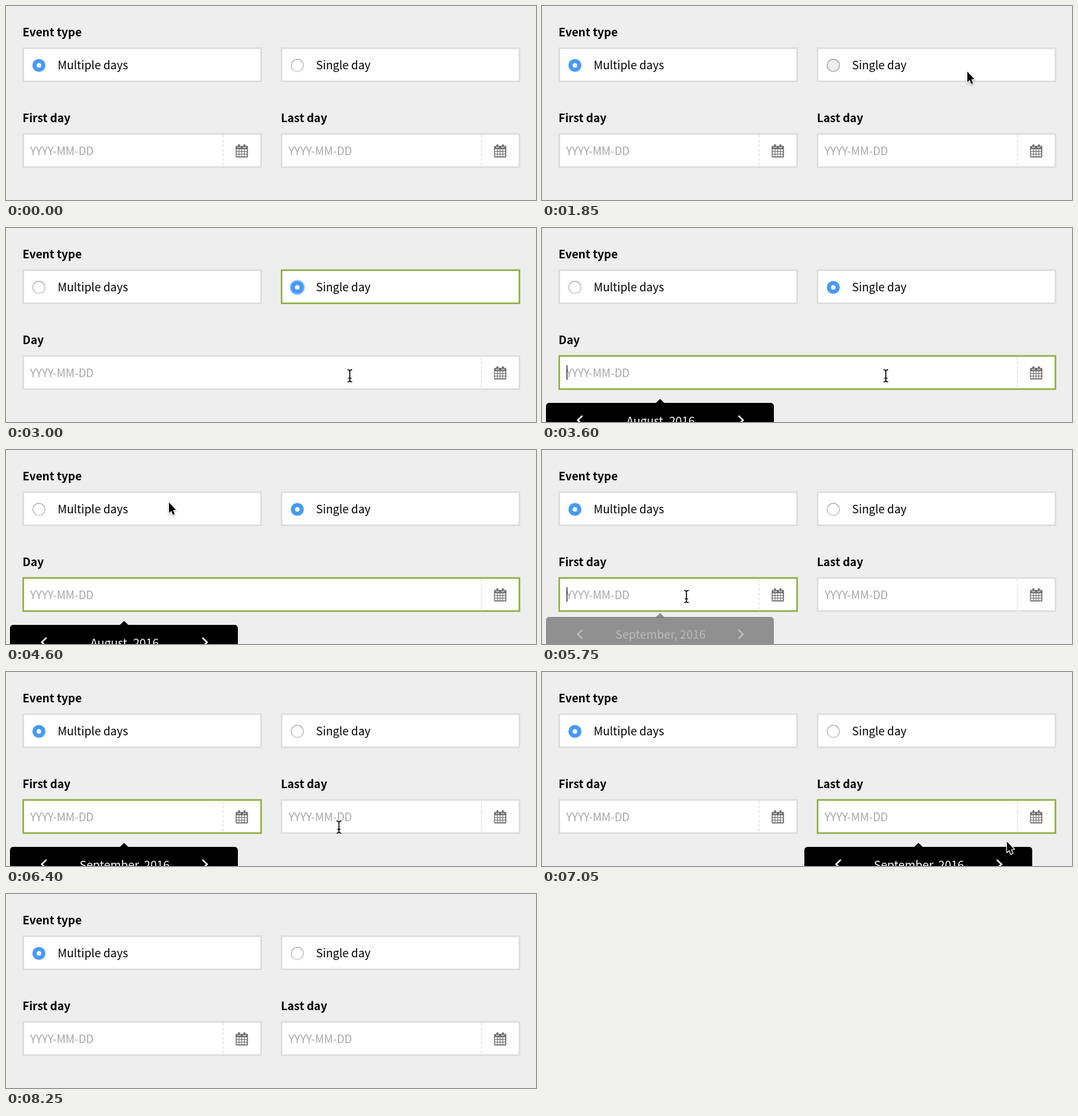
An HTML page with a canvas that plays this animation: 800x294 px, repeating every 8300 ms.

```html
<!DOCTYPE html>
<html lang="en">
<head>
<meta charset="utf-8">
<title>Event form</title>
<style>
  html, body { margin: 0; width: 100%; height: 100%; overflow: hidden; background: #eee; }
  canvas { display: block; width: 800px; height: 294px; }
</style>
</head>
<body>
<canvas id="stage" width="800" height="294"></canvas>
<script>
const ctx = document.getElementById('stage').getContext('2d');
const LOOP = 8300;
const FAMILY = '"Noto Sans CJK SC", "Noto Sans CJK JP", "Noto Sans CJK", "Noto Sans", sans-serif';
const GREY = '#dcdcdc', GREEN = '#8fad41', BLUE = '#459af7';
const LEFT = 25, RIGHT = 415, HALF = 361, FULL = 751;
const FIELD_TOP = 193, BOX_HEIGHT = 52, ICON_WIDTH = 59;

// Which control has the focus from each time on
const focusSteps = [
  [0, ''], [1900, 'single'], [3150, 'first'], [4700, 'multiple'],
  [5750, 'first'], [6430, 'last'], [7250, '']
];

// Pointer path: time, x, y, easing towards this point
const path = [
  [1000, 748, 296, 'both'], [1450, 642, 99, 'both'],
  [2150, 642, 99, 'both'], [2650, 606, 142, 'in'], [3000, 519, 224, 'out'],
  [4100, 519, 224, 'both'], [4600, 246, 79, 'both'],
  [5250, 246, 79, 'both'], [5550, 218, 222, 'both'],
  [5900, 218, 222, 'both'], [6400, 502.5, 235, 'both'],
  [6850, 502.5, 235, 'both'], [7150, 770, 264, 'both'],
  [7280, 770, 264, 'both'], [7450, 758, 298, 'in']
];

const ease = {
  in: p => p * p,
  out: p => p * (2 - p),
  both: p => p * p * (3 - 2 * p)
};
const clamp = v => Math.max(0, Math.min(1, v));
const between = (t, a, b) => t >= a && t < b;

function text(str, x, y, size, color, weight = 400, align = 'left') {
  ctx.font = `${weight} ${size}px ${FAMILY}`;
  ctx.textAlign = align;
  ctx.fillStyle = color;
  ctx.fillText(str, x, y);
}

function disc(x, y, r, color) {
  ctx.fillStyle = color;
  ctx.beginPath();
  ctx.arc(x, y, r, 0, Math.PI * 2);
  ctx.fill();
}

function polyline(points, close) {
  ctx.beginPath();
  points.forEach(([x, y]) => ctx.lineTo(x, y));
  if (close) ctx.closePath();
}

function box(x, y, w, focused) {
  ctx.fillStyle = '#fff';
  ctx.fillRect(x, y, w, BOX_HEIGHT);
  ctx.strokeStyle = focused ? GREEN : GREY;
  ctx.lineWidth = 2.4;
  ctx.strokeRect(x + 1, y + 0.9, w - 2, BOX_HEIGHT - 1.8);
}

function radio(x, y, checked, pressed, focusAge) {
  if (checked) {
    if (focusAge >= 0) {
      const p = clamp(focusAge / 150);
      ctx.globalAlpha = 0.3 + 0.7 * p;
      disc(x, y, 16 - 4.4 * p, '#a3cdf8');
      ctx.globalAlpha = 1;
    }
    disc(x, y, 9.8, BLUE);
    disc(x, y, 3.5, '#fff');
    return;
  }
  disc(x, y, 9.3, pressed ? '#eeeeee' : '#fff');
  const rim = ctx.createLinearGradient(0, y - 10, 0, y + 10);
  rim.addColorStop(0, pressed ? '#999' : '#a6a6a6');
  rim.addColorStop(1, pressed ? '#aaa' : '#c4c4c4');
  ctx.strokeStyle = rim;
  ctx.lineWidth = 1.3;
  ctx.beginPath();
  ctx.arc(x, y, 9.3, 0, Math.PI * 2);
  ctx.stroke();
}

function option(x, label, state) {
  box(x, 63, HALF, state.focusAge >= 0);
  radio(x + 24.7, 90, state.checked, state.pressed, state.focusAge);
  text(label, x + 53, 96, 17.1, '#000');
}

function calendarIcon(x, y) {
  ctx.fillStyle = '#6e6e6e';
  ctx.beginPath();
  ctx.roundRect(x, y + 2.5, 18.5, 17.5, 1.5);
  ctx.fill();
  ctx.fillStyle = '#fff';
  for (let row = 0; row < 3; row++)
    for (let col = 0; col < 4; col++)
      ctx.fillRect(x + 1.4 + col * 4.1, y + 7.6 + row * 3.9, 3.1, 2.9);
  for (const dx of [3.4, 11.6]) {
    ctx.fillStyle = '#fff';
    ctx.fillRect(x + dx - 0.4, y + 2, 4.2, 3.6);
    ctx.fillStyle = '#6e6e6e';
    ctx.beginPath();
    ctx.roundRect(x + dx, y, 3.4, 5, 1.5);
    ctx.fill();
  }
}

function field(x, w, label, focusAge) {
  text(label, x, 176, 17, '#000', 600);
  box(x, FIELD_TOP, w, focusAge >= 0);
  text('YYYY-MM-DD', x + 11.5, 226, 16.7, '#a6a6a6');

  const split = x + w - ICON_WIDTH;
  ctx.strokeStyle = '#d9d9d9';
  ctx.lineWidth = 1.2;
  ctx.setLineDash([4, 3]);
  polyline([[split + 0.5, 195.5], [split + 0.5, 243]]);
  ctx.stroke();
  ctx.setLineDash([]);
  calendarIcon(split + 19.7, 209.5);

  if (focusAge >= 0 && Math.floor(focusAge / 475) % 2 === 0) {
    ctx.fillStyle = '#222';
    ctx.fillRect(x + 12, 208, 1.3, 22);
  }
}

function chevron(x, dir) {
  polyline([[x + 7 * dir, 284.5], [x, 291.3], [x + 7 * dir, 298]]);
  ctx.strokeStyle = '#fff';
  ctx.lineWidth = 2.4;
  ctx.stroke();
}

function picker(x, month, age) {
  const p = 1 - Math.pow(1 - clamp((age + 30) / 200), 3);
  ctx.save();
  ctx.globalAlpha = p;
  ctx.translate(x, -20 * (1 - p));
  ctx.fillStyle = '#000';
  ctx.beginPath();
  ctx.roundRect(6, 265, 344, 80, 5);
  ctx.fill();
  polyline([[171.5, 265.5], [178.3, 259], [185, 265.5]], true);
  ctx.fill();
  chevron(54, 1);
  chevron(303.5, -1);
  text(`${month}, 2016`, 179, 298.5, 17.4, '#fff', 500, 'center');
  ctx.restore();
}

function arrow(x, y) {
  ctx.save();
  ctx.translate(x, y);
  polyline([[0, 0.5], [0, 16.5], [3.5, 13.2], [6, 19.2], [8.6, 18.1], [6.1, 12.2], [10.6, 11.8]], true);
  ctx.lineJoin = 'round';
  ctx.shadowColor = 'rgba(0,0,0,.35)';
  ctx.shadowBlur = 2;
  ctx.shadowOffsetY = 1;
  ctx.strokeStyle = '#fff';
  ctx.lineWidth = 2.4;
  ctx.stroke();
  ctx.shadowColor = 'transparent';
  ctx.fillStyle = '#000';
  ctx.fill();
  ctx.restore();
}

function beam(x, y) {
  ctx.save();
  ctx.translate(x, y);
  ctx.beginPath();
  for (const s of [-1, 1]) {
    ctx.moveTo(-3.5, 9.3 * s);
    ctx.quadraticCurveTo(0, 9.3 * s, 0, 6.5 * s);
    ctx.quadraticCurveTo(0, 9.3 * s, 3.5, 9.3 * s);
  }
  ctx.moveTo(0, -7);
  ctx.lineTo(0, 7);
  ctx.moveTo(-2.4, 3.4);
  ctx.lineTo(2.4, 3.4);
  for (const [color, width] of [['#fff', 3.4], ['#000', 1.5]]) {
    ctx.strokeStyle = color;
    ctx.lineWidth = width;
    ctx.stroke();
  }
  ctx.restore();
}

function pointerAt(t) {
  const i = path.findIndex(key => key[0] > t);
  if (i < 1) return null;
  const [t0, x0, y0] = path[i - 1];
  const [t1, x1, y1, kind] = path[i];
  const p = ease[kind]((t - t0) / (t1 - t0));
  return [x0 + (x1 - x0) * p, y0 + (y1 - y0) * p];
}

function drawPointer(t, fields) {
  const at = pointerAt(t);
  if (!at) return;
  const [x, y] = at;
  const typing = between(y, FIELD_TOP, FIELD_TOP + BOX_HEIGHT) &&
    fields.some(f => between(x, f.x, f.x + f.w - ICON_WIDTH));
  (typing ? beam : arrow)(x, y);
}

function draw(t) {
  const [since, focus] = focusSteps.filter(step => step[0] <= t).pop();
  const age = name => focus === name ? t - since : -1;
  const single = between(t, 1900, 4700);

  ctx.fillStyle = '#eee';
  ctx.fillRect(0, 0, 800, 294);
  text('Event type', LEFT, 46, 17, '#000', 600);
  option(LEFT, 'Multiple days', {
    checked: !single, pressed: between(t, 4650, 4700), focusAge: age('multiple')
  });
  option(RIGHT, 'Single day', {
    checked: single, pressed: between(t, 1850, 1900), focusAge: age('single')
  });

  const fields = single
    ? [{ x: LEFT, w: FULL, label: 'Day', id: 'first' }]
    : [{ x: LEFT, w: HALF, label: 'First day', id: 'first' },
       { x: RIGHT, w: HALF, label: 'Last day', id: 'last' }];
  for (const f of fields) field(f.x, f.w, f.label, age(f.id));
  for (const f of fields)
    if (focus === f.id) picker(f.x - LEFT, single ? 'August' : 'September', age(f.id));
  drawPointer(t, fields);
}

function tick() {
  draw(performance.now() % LOOP);
  requestAnimationFrame(tick);
}
tick();
</script>
</body>
</html>
```
